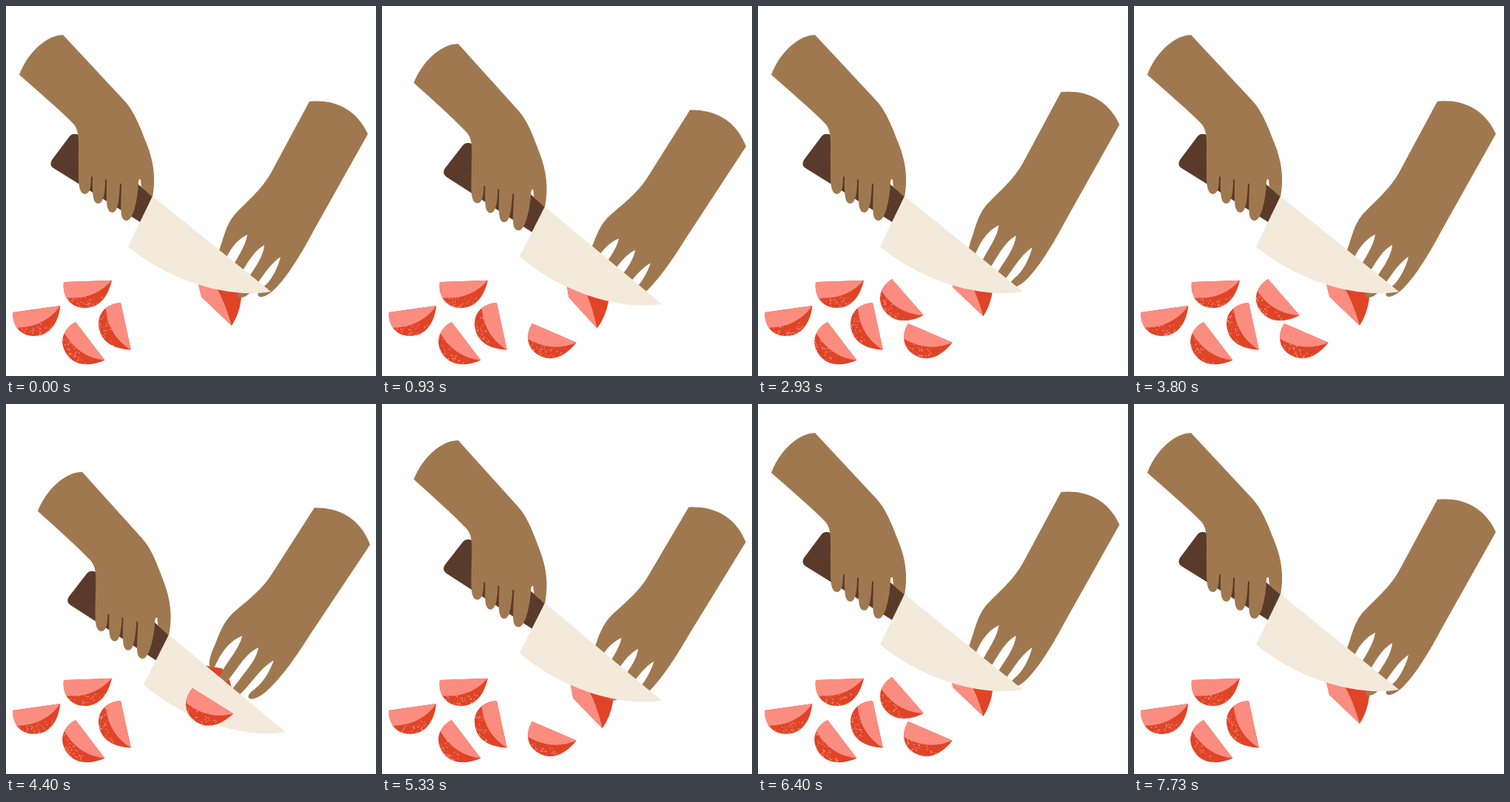
These frames come from a looping animation (500 px wide and 500 px high, 7790 ms). An HTML page with a canvas:

```html
<!DOCTYPE html>
<html lang="en">
<head>
<meta charset="utf-8">
<title>Chopping</title>
<style>
  html, body { margin: 0; width: 100%; height: 100%; overflow: hidden; background: #fff; }
  canvas { display: block; }
</style>
</head>
<body>
<canvas id="stage" width="500" height="500"></canvas>
<script>
const ctx = document.getElementById('stage').getContext('2d');
const LOOP = 7790, ROUND = 48, CHOP = 15;
const SKIN = '#a0784f', WOOD = '#5a3b2b', STEEL = '#f3eadc', PINK = '#fb8d80', RED = '#df4427';

const shape = d => new Path2D(d);
const handle = shape('M86 176Q90 171 98 174L198 257L183 293L64 219Q58 215 62 208Z');
const blade = shape('M198 257L358 386C300 396 220 371 165 325Z');
const leftHand = shape(`M77 39L160 128C174 143 182 166 190 186C199 208 203 232 198 258
  L183 245L182 235Q180 232 179 238C178 262 172 290 163 290C152 290 156 268 156 240L154 240
  C153 262 151 279 144 279C134 279 136 260 136 235L134 234C134 255 131 267 125 267
  C116 267 117 250 117 231L115 230C115 245 113 254 107 254C97 254 98 235 98 210
  C98 185 100 168 90 158C70 138 42 114 18 93C28 66 52 40 77 39Z`);
const rightHand = shape(`M410 129C440 126 472 136 489 173L416 303C402 330 365 396 343 393
  C337 390 343 384 352 376C360 368 368 352 371 339C347 355 334 394 318 394C307 394 316 386 326 370
  C333 358 348 340 349 323C328 335 320 364 306 376C299 378 297 372 303 358C311 342 324 325 326 309
  C308 318 299 335 292 354C284 357 282 350 288 330C293 318 296 298 308 283C322 267 346 249 360 222Z`);
const wedge = shape('M266 362L280 353L302 355Q319 370 318 395Q315 417 305 432L264 393L260 376Z');
const wedgeFace = shape('M266 362L280 374Q294 394 305 432L264 393L260 376Z');
const sliceRind = shape('M0 0L65 0C60 20 48 36 29 36C8 36 -3 20 0 0Z');
const sliceFace = shape('M-5 0L65 0C48 18 25 26 -5 20Z');

// Resting places: x, y, angle
const PILE = [[78, 373, -2], [9, 414, -8], [94, 427, 52.6], [155, 401, 77.7]];

// Keys: frame, then values
const SHIFT = [[0, 0], [2, .92], [3, 1], [11, 1], [15, 0]];
const DROP = [[0, 0], [2, 10.5], [3, 12], [6.7, 55.5], [8, 47], [11, 14], [12, 11.5], [15, 0]];
const HOLD = [[0, 0, 0, 0], [7, -8, 6, 4.4], [18, -3, 8, 2.2], [23, 0, 9, 1],
  [32, -.5, -10, 0], [37, -.5, -13, 0], [48, 0, 0, 0]];
const FALLS = [
  [[5, 266, 368, 36], [7, 252, 384, 32], [11, 203, 429, 23.4]],
  [[20, 266, 366, 34], [23, 232, 361, 39.5], [27, 181, 369, 48.8]]
];

// Smooth monotone interpolation through keys
function curve(keys, t) {
  const last = keys.length - 1;
  if (t >= keys[last][0]) return keys[last].slice(1);
  let i = 0;
  while (t >= keys[i + 1][0]) i++;
  const [a, b] = [keys[i], keys[i + 1]], span = b[0] - a[0], u = (t - a[0]) / span;
  return a.slice(1).map((from, k) => {
    const slope = j => (keys[j + 1][k + 1] - keys[j][k + 1]) / (keys[j + 1][0] - keys[j][0]);
    const tangent = j => {
      if (j === 0 || j === last) return 0;
      const p = slope(j - 1), q = slope(j);
      return p * q > 0 ? 2 * p * q / (p + q) : 0;
    };
    const to = b[k + 1], s = u * u * (3 - 2 * u);
    return from + (to - from) * s
      + span * (tangent(i) * u * (1 - u) ** 2 - tangent(i + 1) * u * u * (1 - u));
  });
}

function random(seed) {
  return () => {
    seed = (seed * 1664525 + 1013904223) >>> 0;
    return seed / 4294967296;
  };
}

function fill(path, color) {
  ctx.fillStyle = color;
  ctx.fill(path);
}

function posed(px, py, dx, dy, angle, draw) {
  ctx.save();
  ctx.translate(px + dx, py + dy);
  ctx.rotate(angle * Math.PI / 180);
  ctx.translate(-px, -py);
  draw();
  ctx.restore();
}

function slice([x, y, angle], seed) {
  posed(0, 0, x, y, angle, () => {
    fill(sliceRind, RED);
    ctx.clip(sliceRind);
    const rnd = random(seed);
    ctx.fillStyle = PINK;
    for (let i = 0; i < 60; i++) {
      const px = 4 + rnd() * 52, py = 36 - rnd() ** 1.5 * 15;
      ctx.beginPath();
      ctx.arc(px, py, .4 + rnd() * .6, 0, 7);
      ctx.fill();
    }
    fill(sliceFace, PINK);
  });
}

function draw(frame) {
  const t = frame % ROUND, chop = t < 2 * CHOP ? t % CHOP : 0;
  const grain = Math.floor(frame / 2) * 977;
  ctx.fillStyle = '#fff';
  ctx.fillRect(0, 0, 500, 500);

  PILE.forEach((place, i) => slice(place, grain + i * 7919));

  posed(350, 323, ...curve(HOLD, t), () => {
    fill(wedge, RED);
    fill(wedgeFace, PINK);
    fill(rightHand, SKIN);
  });

  const [shift] = curve(SHIFT, chop), [drop] = curve(DROP, chop);
  posed(200, 260, 22 * shift, drop, shift, () => {
    fill(handle, WOOD);
    fill(blade, STEEL);
    fill(leftHand, SKIN);
  });

  FALLS.forEach((keys, i) => {
    if (t >= keys[0][0]) slice(curve(keys, t), grain + (i + 5) * 7919);
  });
}

// 12.5 drawings a second on a 15 per second grid: every sixth tick repeats
function frameAt(ms) {
  const tick = Math.floor((ms % LOOP + 4) * 15 / 1000);
  return Math.floor(tick / 6) * 5 + Math.max(0, tick % 6 - 1);
}

const start = performance.now();
function play() {
  draw(frameAt(performance.now() - start));
  requestAnimationFrame(play);
}
play();
</script>
</body>
</html>
```
